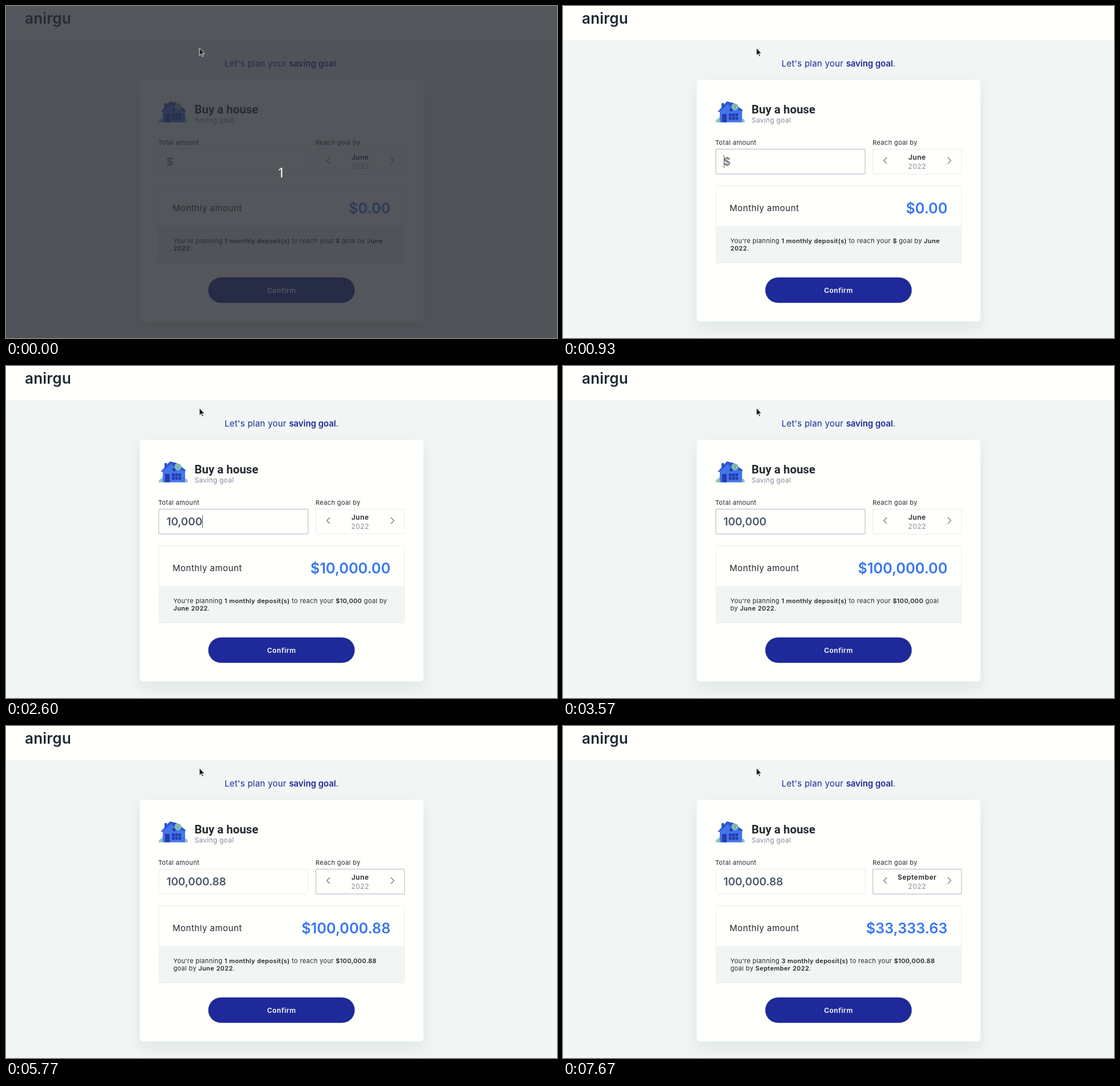
An HTML page for the animation above (8 s loop, 963 by 581 pixels).

```html
<!DOCTYPE html>
<html lang="en">
<head>
<meta charset="utf-8">
<title>Saving goal planner</title>
<style>
  html, body { margin: 0; width: 100%; height: 100%; overflow: hidden; background: #f1f6f4; }
  svg { display: block; width: 963px; height: 581px; font: 12px Inter, sans-serif; letter-spacing: .5px; }
  text { white-space: pre; fill: #23292e; }
  .bold { font-weight: 600; }
  .middle { text-anchor: middle; }
  .grey { fill: #858b99; }
  .label { font-size: 11px; letter-spacing: .38px; }
  .note { font-size: 11px; letter-spacing: .33px; }
  .number { font-weight: 600; font-size: 19px; letter-spacing: -.1px; }
  .box { fill: #fffffc; stroke: #e8ecec; }
  .box.focus { stroke: #c6cbd0; stroke-width: 1.4; }
  .arrow { fill: none; stroke: #858b99; stroke-width: 1.6; }
</style>
</head>
<body>
<svg viewBox="0 0 963 581">
  <defs>
    <filter id="shadow" x="-20%" y="-20%" width="140%" height="140%">
      <feDropShadow dx="0" dy="10" stdDeviation="11" flood-color="#1e3a3a" flood-opacity=".08"/>
    </filter>
  </defs>
  <rect width="963" height="581" fill="#f1f6f4"/>
  <rect width="963" height="60" fill="#fffffc"/>
  <text class="bold" x="33" y="31" style="font-size:26px;letter-spacing:.2px;fill:#1c2a33">anirgu</text>
  <text class="middle" x="481.5" y="106" style="font-size:15px;letter-spacing:.24px;fill:#1e2a99">Let's plan your <tspan class="bold" style="letter-spacing:-.1px">saving goal</tspan>.</text>
  <rect x="234" y="129.5" width="495.5" height="422.5" rx="5" fill="#fffffc" filter="url(#shadow)"/>

  <g id="house">
    <path d="M266.5 203.500q1-6 6-7q1-5 6-5v12zM318 203.500q-1-6-5-7q-2-4-7-4v11z" fill="#8fc5b9"/>
    <path d="M277 180v-10h4.500v6z" fill="#2b50c8"/>
    <path d="M274 203.500v-20l13-13l12 2l14 11v20z" fill="#4474ec"/>
    <path d="M270.500 185l16-18l11 2.500l16.500 12.500l-1 2.500l-16-5l-9-8l-15 14z" fill="#2d55d2"/>
    <circle cx="294" cy="181.500" r="3" fill="#243eac"/>
    <path d="M278 189h8v14.500h-8zM290 188h16v11h-16z" fill="#243eac"/>
    <path d="M290 193.500h16M295.300 188v11M300.700 188v11" stroke="#4474ec"/>
    <circle cx="300.500" cy="176.500" r="6" fill="#8fc5b9"/>
    <circle cx="300.500" cy="176.500" r="4" fill="none" stroke="#6aa99d"/>
    <path d="M300.500 174v5" stroke="#3d7d78"/>
  </g>
  <text x="329.500" y="187.500" style="font:600 20.3px Roboto,sans-serif;letter-spacing:.05px">Buy a house</text>
  <text class="grey" x="329.500" y="204" style="letter-spacing:.25px">Saving goal</text>

  <text class="label" x="266" y="242.500">Total amount</text>
  <rect id="amountBox" class="box" x="267" y="250.500" width="261" height="43.500" rx="2"/>
  <text id="amount" class="number" x="280.500" y="279"></text>
  <rect id="caret" y="261" width="1" height="22" fill="#4b5563"/>

  <text class="label" x="541" y="242.500">Reach goal by</text>
  <rect id="dateBox" class="box" x="541.500" y="250.500" width="155" height="43.500" rx="2"/>
  <path class="arrow" d="M566 265l-5.500 5.500l5.500 5.500M672.500 265l5.500 5.500l-5.500 5.500"/>
  <text id="month" class="bold middle" x="619" y="269"></text>
  <text class="grey middle" x="619" y="284.500">2022</text>

  <rect class="box" x="267" y="314.500" width="429.500" height="135" rx="2"/>
  <path d="M267 385h429.500v64h-429.500z" fill="#f1f6f4"/>
  <text x="291" y="359" style="font-size:15px">Monthly amount</text>
  <text id="monthly" class="number" x="672" y="363" text-anchor="end" style="font-size:25px;letter-spacing:.1px;fill:#3677f0"></text>
  <text id="line1" class="note" x="292.500" y="415"></text>
  <text id="line2" class="note" x="292.500" y="427.500"></text>

  <rect x="353.500" y="475" width="256" height="44.500" rx="22.250" fill="#1e2a99"/>
  <text class="bold middle" x="481.500" y="501.500" style="fill:#fff">Confirm</text>

  <g id="countdown">
    <rect width="963" height="581" fill="rgb(40,44,50)" fill-opacity=".8"/>
    <text class="middle" x="481" y="299.500" style="font:24px 'Noto Sans',sans-serif;letter-spacing:0;fill:#fff">1</text>
  </g>
  <path d="M338 73.500v13l2.900-2.700l2.200 4.800l2-.9l-2.200-4.600h4.200z" fill="#1b1b1b" stroke="#fff" stroke-width=".9"/>
</svg>
<script>
const LOOP = 8000, FOCUS = 930, BLUR = 5770, BLINK = 600;

// time, typed text, total used for the monthly amount (lags behind fast typing)
const typing = [
  [0, "", 0], [FOCUS, "", 0], [1500, "1", 0], [1570, "1", 1], [1770, "10", 1],
  [1930, "10", 10], [1970, "100", 10], [2130, "1,000", 1000], [2600, "10,000", 10000],
  [2970, "100,000", 100000], [3670, "100,000.", 100000],
  [4070, "100,000.8", 100000.8], [4300, "100,000.88", 100000.88]
];
// time, month, number of deposits
const months = [[0, "June", 1], [6370, "July", 2], [6970, "August", 3], [7670, "September", 3]];

const $ = id => document.getElementById(id);
const current = (list, t) => list.filter(([start]) => start <= t).pop();
const bold = s => `<tspan class="bold">${s}</tspan>`;
const show = (id, on) => $(id).setAttribute("visibility", on ? "visible" : "hidden");
const money = n => "$" + n.toLocaleString("en-US", { minimumFractionDigits: 2, maximumFractionDigits: 2 });

function draw(t) {
  const [typedAt, typed, total] = current(typing, t);
  const [, month, deposits] = current(months, t);
  const focused = t >= FOCUS && t < BLUR;

  show("countdown", t < 200);
  $("amountBox").classList.toggle("focus", focused);
  $("dateBox").classList.toggle("focus", t >= BLUR);

  const amount = $("amount");
  amount.textContent = typed || "$";
  amount.style.fill = typed ? "#4b586b" : "#757575";
  show("caret", focused && Math.floor((t - typedAt) / BLINK) % 2 === 0);
  $("caret").setAttribute("x", typed ? 280.5 + amount.getComputedTextLength() : 281);

  $("month").textContent = month;
  $("monthly").textContent = money(total / deposits);

  // Longer amounts push more words to the second line.
  const words = ["goal", "by", bold(month), bold("2022") + "."];
  const size = typed.length;
  const fit = size < 2 ? 3 : size < 7 ? 2 : size < 10 ? 1 : 0;
  const start = `You're planning ${bold(deposits + " monthly deposit(s)")} to reach your ${bold("$" + typed)}`;
  $("line1").innerHTML = [start, ...words.slice(0, fit)].join(" ");
  $("line2").innerHTML = words.slice(fit).join(" ");
}

function tick() {
  draw(performance.now() % LOOP);
  requestAnimationFrame(tick);
}
tick();
</script>
</body>
</html>
```
